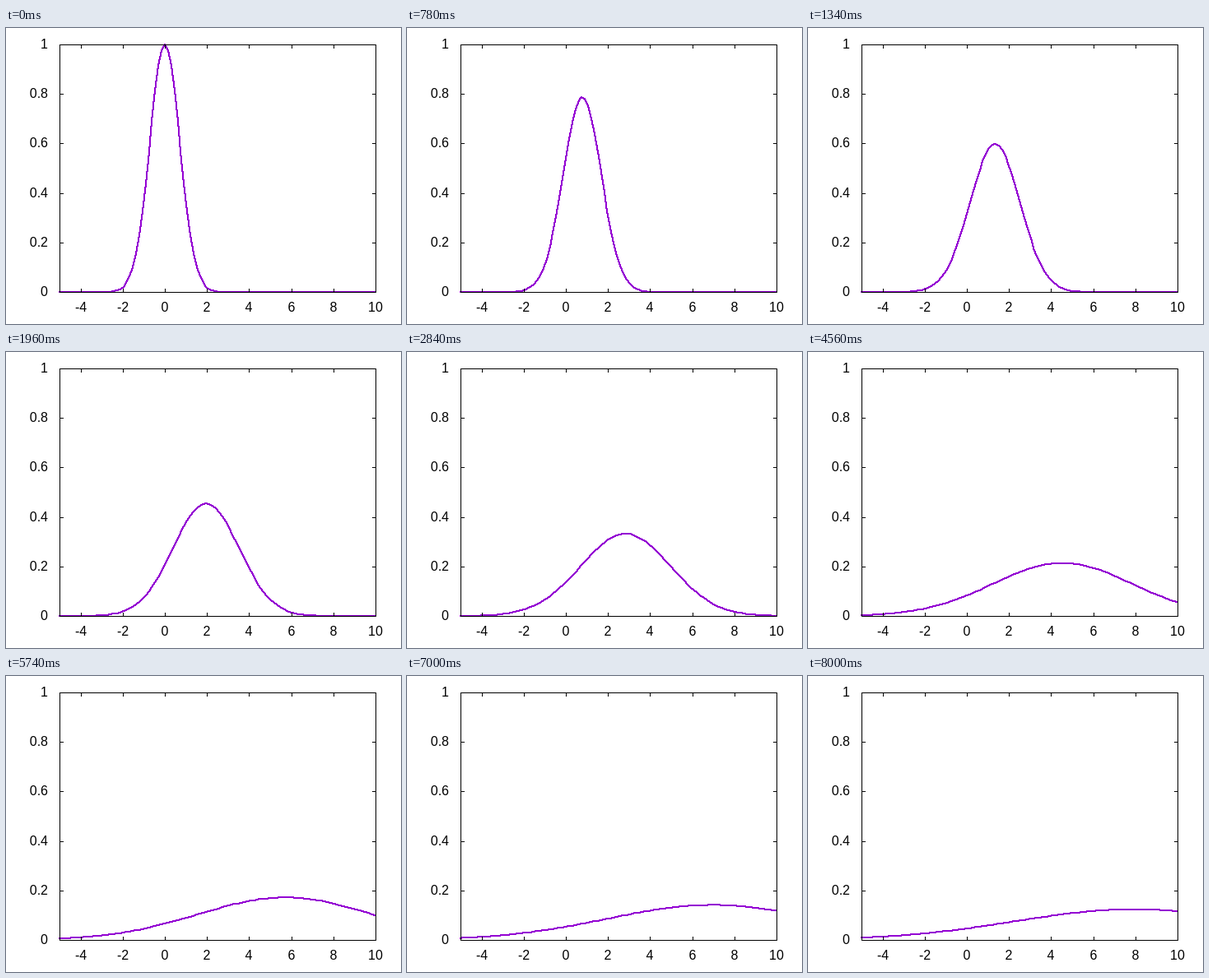
Write an HTML page with a canvas that moves like this. It is 480 px wide and 360 px high and loops after 8.02 s.

```html
<!DOCTYPE html>
<html lang="en">
<head>
<meta charset="utf-8">
<title>Spreading wave packet</title>
<style>
html, body { margin: 0; width: 100%; height: 100%; overflow: hidden; background: #fff; }
canvas { display: block; }
</style>
</head>
<body>
<canvas id="plot" width="480" height="360"></canvas>
<script>
const ctx = document.getElementById('plot').getContext('2d');
const LEFT = 65, RIGHT = 449, TOP = 20, BOTTOM = 321;
const LOOP = 8020, STEP = 20, SAMPLES = 100, TIC = 4;

const mapX = x => Math.round(LEFT + (x + 5) / 15 * (RIGHT - LEFT));
const mapY = y => BOTTOM - Math.round(y * (BOTTOM - TOP));

// Probability density of a free Gaussian packet moving at unit speed
function density(x, t) {
  const spread = 1 + t * t;
  return Math.exp(-((x - t) ** 2) / spread) / Math.sqrt(spread);
}

// Crisp integer line drawn with a 2x2 pixel brush
function brushLine(x1, y1, x2, y2) {
  const steep = Math.abs(y2 - y1) > Math.abs(x2 - x1);
  if (steep && y1 > y2) [x1, y1, x2, y2] = [x2, y2, x1, y1];
  const dx = x2 - x1, dy = y2 - y1;
  const long = steep ? dy : dx, short = steep ? dx : dy;
  for (let k = 0; k <= long; k++) {
    const shift = Math.sign(short) * Math.floor((2 * k * Math.abs(short) + long) / (2 * long));
    const x = x1 + (steep ? shift : k), y = y1 + (steep ? k : shift);
    ctx.fillRect(x - 1, y - 1, 2, 2);
  }
}

function drawCurve(t) {
  ctx.fillStyle = '#9400d3';
  let px, py;
  for (let i = 0; i < SAMPLES; i++) {
    const x = -5 + 15 * i / (SAMPLES - 1);
    const sx = mapX(x), sy = mapY(density(x, t));
    if (i) brushLine(px, py, sx, sy);
    [px, py] = [sx, sy];
  }
}

function drawAxes() {
  ctx.fillStyle = '#000';
  ctx.font = '16px "Liberation Sans", Arial, sans-serif';
  const w = RIGHT - LEFT + 1, h = BOTTOM - TOP + 1;
  for (const y of [TOP, BOTTOM]) ctx.fillRect(LEFT, y, w, 1);
  for (const x of [LEFT, RIGHT]) ctx.fillRect(x, TOP, 1, h);

  ctx.textAlign = 'center';
  for (let v = -4; v <= 10; v += 2) {
    const x = mapX(v);
    ctx.fillRect(x, TOP, 1, TIC + 1);
    ctx.fillRect(x, BOTTOM - TIC, 1, TIC + 1);
    ctx.fillText(v, x, 345);
  }
  ctx.textAlign = 'right';
  for (let i = 0; i <= 5; i++) {
    const y = mapY(i / 5);
    ctx.fillRect(LEFT, y, TIC + 1, 1);
    ctx.fillRect(RIGHT - TIC, y, TIC + 1, 1);
    ctx.fillText(i / 5, 51, y + 5);
  }
}

function draw() {
  const ms = performance.now() % LOOP;
  ctx.fillStyle = '#fff';
  ctx.fillRect(0, 0, 480, 360);
  drawCurve(Math.floor(ms / STEP) * STEP / 1000);
  drawAxes();
  requestAnimationFrame(draw);
}
draw();
</script>
</body>
</html>
```
